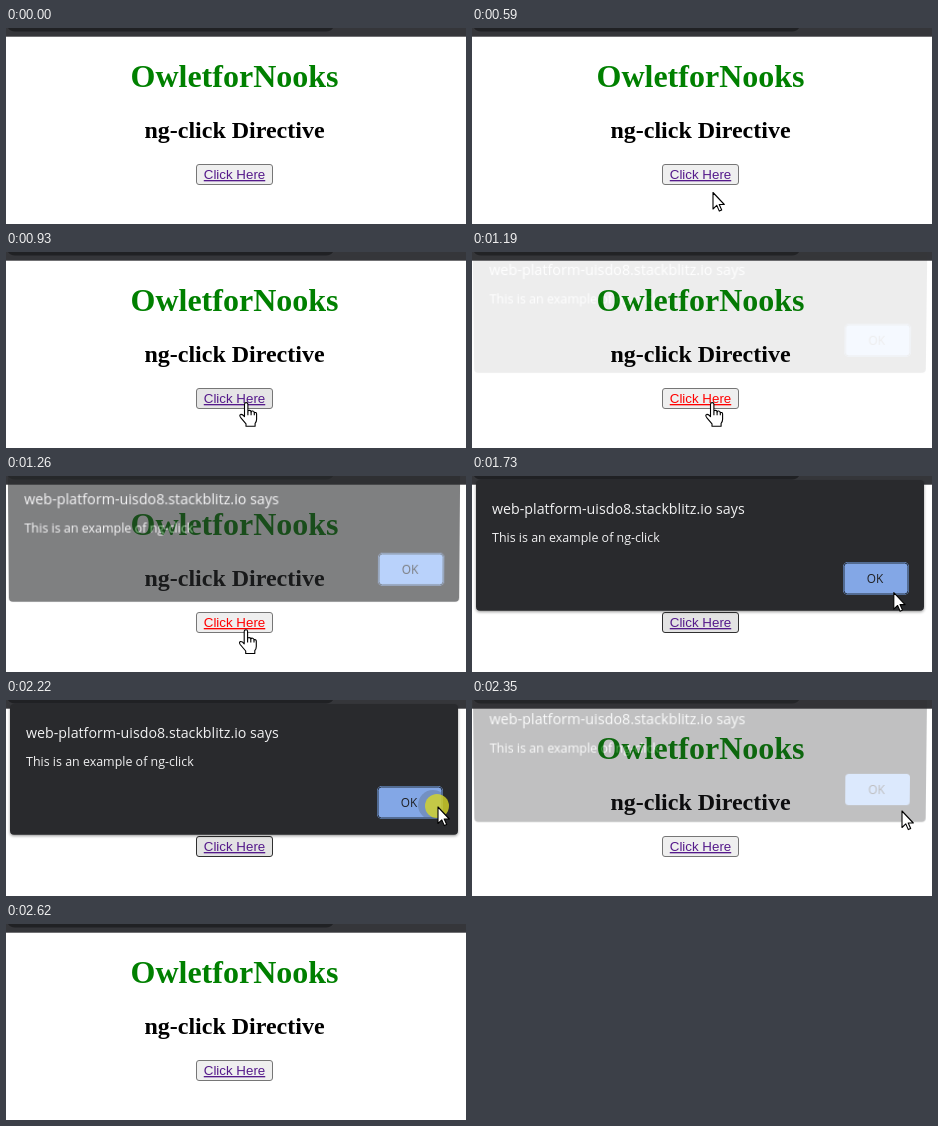
An HTML page that plays this animation: 460 by 196 pixels, repeating every 3360 ms.

```html
<!DOCTYPE html>
<html lang="en">
<head>
<meta charset="utf-8">
<title>ng-click Directive</title>
<style>
  html, body { margin: 0; width: 100%; height: 100%; overflow: hidden; background: #fff; }
  svg { position: absolute; left: 0; top: 0; width: 460px; height: 196px; overflow: hidden; }
  #dialog { overflow: visible; transform-origin: 228px 135px; }
  .serif { font-family: "Liberation Serif", "Times New Roman", serif; font-weight: bold; text-anchor: middle; }
  .ui { font-family: "Open Sans", "Noto Sans", sans-serif; fill: #f1f1f2; }
  #link { font: 13.333px "Liberation Sans", Arial, sans-serif; text-decoration: underline; text-anchor: middle; }
</style>
</head>
<body>
<svg viewBox="0 0 460 196">
  <rect width="460" height="8.7" fill="#35363a"/>
  <path d="M2 0H327Q325 3.4 320 3.4H9Q4 3.4 2 0Z" fill="#202124"/>
  <text class="serif" x="228.5" y="59" font-size="32" fill="#008000">OwletforNooks</text>
  <text class="serif" x="228.5" y="110" font-size="24">ng-click Directive</text>
  <rect id="button" x="190.5" y="136.5" width="76" height="20" rx="2.5"/>
  <text id="link" x="228.5" y="151">Click Here</text>
</svg>

<svg id="dialog" viewBox="0 0 460 196">
  <defs>
    <clipPath id="okClip"><rect x="373" y="88" width="62" height="29" rx="3"/></clipPath>
    <filter id="soft" x="-5%" y="-10%" width="110%" height="120%"><feGaussianBlur stdDeviation="1.5"/></filter>
  </defs>
  <rect id="shadow" x="4" y="6" width="448" height="130" rx="4" opacity=".4" filter="url(#soft)"/>
  <rect x="4" y="4" width="448" height="130.8" rx="4" fill="#292a2d"/>
  <text class="ui" x="20" y="38" font-size="14.23">web-platform-uisdo8.stackblitz.io says</text>
  <text class="ui" x="20" y="66" font-size="12.44">This is an example of ng-click</text>
  <rect id="ring" x="372" y="87" width="64" height="31" rx="4" fill="none" stroke="#7fa6e6" stroke-width="2"/>
  <rect id="ok" x="372" y="87" width="64" height="31" rx="3.5"/>
  <circle id="ripple" cx="427" cy="105" r="15" fill="#7390c2" clip-path="url(#okClip)"/>
  <text class="ui" x="403" y="107" font-size="11.8" text-anchor="middle" style="fill:#202124">OK</text>
</svg>

<svg viewBox="0 0 460 196">
  <circle id="spot" cx="431" cy="106" fill="#d7d728" opacity=".8"/>
  <g id="cursor" fill="#fff" stroke="#000" stroke-width="1.1" stroke-linejoin="round">
    <path id="arrow" d="M0 0V16.5L3.8 12.9 6.3 18.6 8.7 17.5 6.2 12H11.3Z"/>
    <g id="hand">
      <path d="M-1.5 2a1.7 1.7 0 0 1 3.4 0V9.5q0-1.5 1.6-1.4t1.6 1.6q.3-1.2 1.7-1t1.5 1.6q1.8-.6 2.3 1.2V17q0 2.5-1.5 4V24H0V21.5L-5.5 15q-1.5-2.3.3-2.9 1.6-.3 3.7 2.2Z"/>
      <path d="M1.9 9.5V13M5.1 9.7V13M8.3 10.3V13" fill="none"/>
    </g>
  </g>
</svg>

<script>
const LOOP = 3360;
const $ = id => document.getElementById(id);
const set = (id, attrs) => {
  for (const key in attrs) $(id).setAttribute(key, attrs[key]);
};
const show = (id, on) => set(id, { visibility: on ? 'visible' : 'hidden' });

// Number of screen updates shown so far in a burst of n, from a to b.
const ticks = (t, a, b, n) =>
  t < a ? 0 : Math.min(n, 1 + Math.floor((t - a + 6) / (b - a) * (n - 1)));

// Point on a polyline at u in 0..1.
function along(points, u) {
  const s = u * (points.length - 1);
  const i = Math.min(Math.floor(s), points.length - 2);
  return points[i].map((v, k) => v + (points[i + 1][k] - v) * (s - i));
}

const ENTER = [[303, 204], [241, 164.5]];
const AIM = [[241, 164.5], [240, 150.3]];
const CROSS = [[240, 150.3], [240, 150.3], [240, 150.3], [239.7, 153.5], [239.7, 156.5],
               [242, 167], [300, 156], [370, 140], [415, 123]];
const PRESS = [[415, 123], [432, 107]];
const LEAVE = [[432, 107], [432, 107], [432, 107], [431, 109], [430, 111],
               [436, 130], [442, 150], [447, 169], [450, 196]];
const FADE_IN = [0, 0, 0.09, 0.6, 1];
const FADE_OUT = [1, 1, 1, 0.75, 0.3, 0.03, 0];

function draw(t) {
  const enter = ticks(t, 390, 590, 4);
  const aim = ticks(t, 790, 930, 3);
  const open = ticks(t, 1130, 1590, 8);
  const press = ticks(t, 1660, 1950, 5);
  const close = ticks(t, 2150, 2620, 8);

  const [x, y] = close ? along(LEAVE, close / 8)
    : press ? along(PRESS, press / 5)
    : open ? along(CROSS, open / 8)
    : aim ? along(AIM, aim / 3)
    : along(ENTER, enter / 4);
  const pointing = aim >= 2 && open < 5;
  set('cursor', { transform: `translate(${x} ${y})` });
  show('arrow', enter && close < 8 && !pointing);
  show('hand', pointing);

  const stale = open >= 5 && close < 3;
  set('button', {
    fill: stale ? '#e3e3e3' : pointing && !open ? '#e5e5e5' : '#efefef',
    stroke: stale ? '#303030' : '#767676'
  });
  set('link', { fill: open && open < 5 ? '#f00' : '#551a8b' });

  const alpha = close ? FADE_OUT[Math.min(close, 6)] : FADE_IN[Math.min(open, 4)];
  const away = 1 - alpha * alpha;
  const dialog = $('dialog').style;
  dialog.opacity = alpha;
  dialog.transform = away
    ? `translateY(${-14 * away}px) perspective(1200px) rotateX(${-3.7 * away}deg) scale(${1 + 0.008 * away})`
    : 'none';
  show('shadow', alpha === 1);
  show('ring', close < 3);
  set('ok', {
    fill: press && close < 3 ? '#83a7e6' : '#8ab4f8',
    stroke: close < 3 ? '#24303f' : 'none'
  });

  const clicked = close === 1 || close === 2;
  show('ripple', clicked);
  show('spot', clicked);
  set('spot', { r: close === 1 ? 9 : 12 });
}

const start = performance.now();
function frame() {
  draw((performance.now() - start) % LOOP);
  requestAnimationFrame(frame);
}
frame();
</script>
</body>
</html>
```
